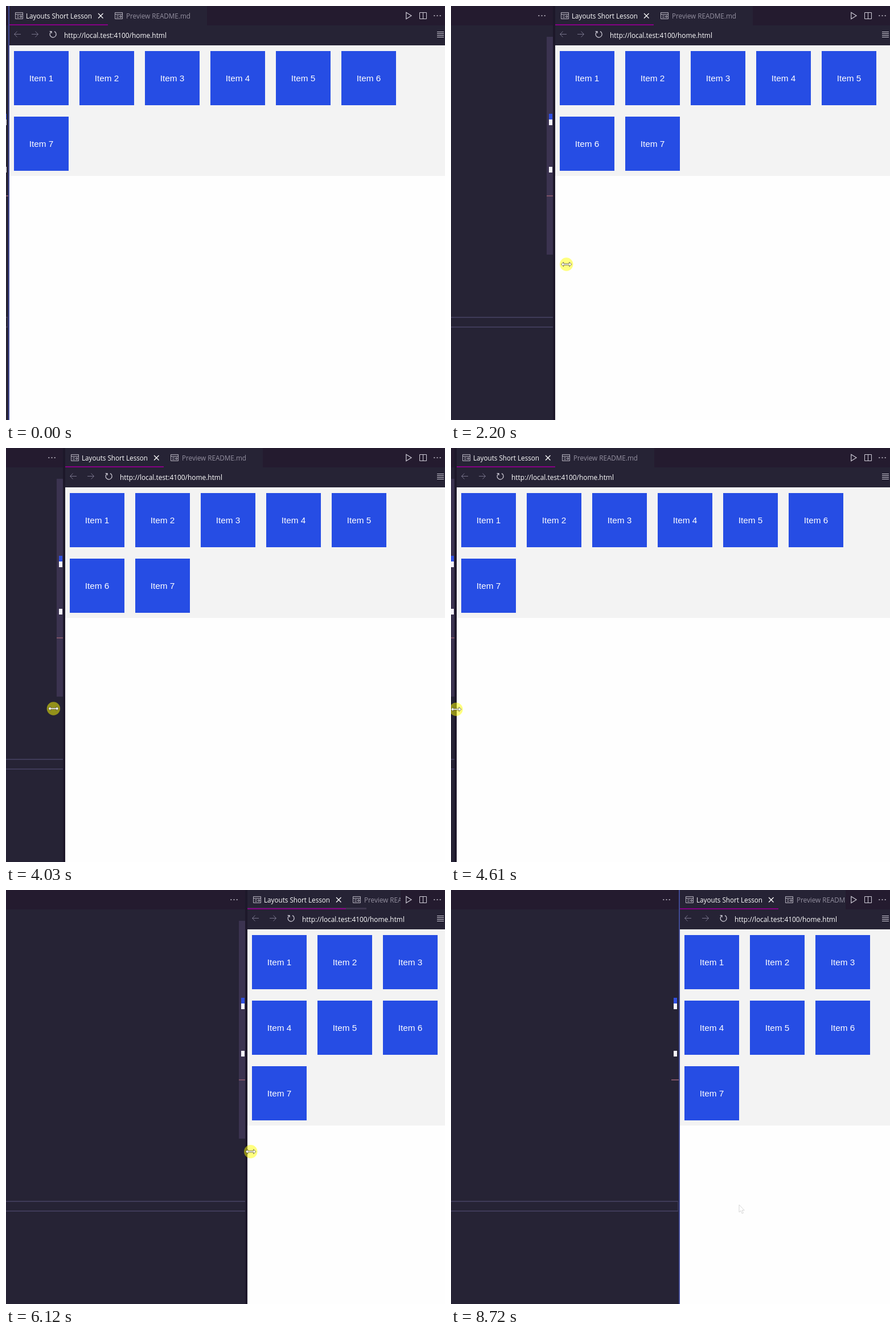
Animation of 771x726 px, one loop 8850 ms. Source, as an HTML page:

```html
<!DOCTYPE html>
<html lang="en">
<head>
<meta charset="utf-8">
<title>Resizable preview</title>
<style>
html, body { margin: 0; width: 100%; height: 100%; overflow: hidden; background: #262335; }
#stage { position: relative; width: 771px; height: 726px; overflow: hidden; background: #262335; font: 11.7px "Open Sans", "Noto Sans", sans-serif; }
#stage div, #stage svg, #stage span { position: absolute; }
svg { fill: none; stroke: #d0cdd8; overflow: visible; }

#editor { left: 0; top: 0; height: 726px; }
.head { left: 0; right: 0; top: 0; height: 34px; background: #241b2f; }
#slider { right: 2px; top: 54px; width: 11px; height: 382px; background: #3b3350; }
.mark { right: 3px; width: 6px; background: #f4f2fa; }
#rule { right: 0; top: 332px; width: 13px; height: 2px; background: #7d5366; }
#row { left: -2px; right: 1px; top: 545px; height: 15px; border: solid #3f3b59; border-width: 2px 0; }
#gap { left: -2px; top: 0; width: 4px; height: 726px; background: #1d182a; }
#focus { left: 0; top: 0; width: 2px; height: 726px; background: #414a96; }

#pane { right: 0; top: 0; height: 726px; }
#page { left: 2px; right: 0; top: 68px; bottom: 0; background: #fefefe; }
#items { left: 0; right: 0; top: 0; display: flex; flex-wrap: wrap; background: #f3f3f3; }
#items div { position: static; flex: none; width: 96px; height: 95px; margin: 11px 11px 9px 8px; background: #264de4; color: #fff; font: 15.33px/95px "Liberation Sans", Arial, sans-serif; text-align: center; }
#tabs { left: 2px; top: 0; width: 347px; height: 34px; background: #262335; }
#line { left: 2px; top: 32px; width: 173px; height: 2px; background: #850085; }
#thumb { left: 2px; top: 31px; height: 3px; background: #3e374f; }
#bar { left: 2px; right: 0; top: 34px; height: 35px; background: #262335; }
#tools { right: 0; top: 0; width: 78px; height: 34px; background: #241b2f; }
span { white-space: nowrap; color: #fff; line-height: 34px; top: 0; }
.dim { color: #9490a0; }
.faint { stroke: #77738a; }
#pointer { left: 0; top: 0; width: 1px; height: 1px; }
</style>
</head>
<body>
<div id="stage">
  <div id="editor">
    <div class="head"></div>
    <svg style="right:15px;top:16px" width="13" height="3"><path id="dots" d="M.3 1h2M5.500 1h2M10.700 1h2" stroke-width="1.600"/></svg>
    <div id="slider"></div>
    <div class="mark" style="top:189px;height:10px;background:#304fe0"></div>
    <div class="mark" style="top:199px;height:10px"></div>
    <div class="mark" style="top:282px;height:10px"></div>
    <div id="rule"></div>
    <div id="row"></div>
  </div>
  <div id="pane">
    <div id="page"><div id="items"></div></div>
    <div class="head"></div>
    <div id="tabs">
      <svg style="left:10px;top:11px" width="14" height="12"><path id="layout" d="M.5.5h13v11H.5zM.5 3.500h13M3 6h4M3 9h4M9 6h2.500v3H9z" stroke-opacity=".85"/></svg>
      <span style="left:29px">Layouts Short Lesson</span>
      <svg style="left:156px;top:13px" width="9" height="9"><path d="M0 0l8.500 8.500M8.500 0L0 8.500" stroke="#fff" stroke-width="1.300"/></svg>
      <svg style="left:185px;top:11px" width="14" height="12"><use href="#layout"/></svg>
      <span class="dim" style="left:205px">Preview README.md</span>
    </div>
    <div id="thumb"></div>
    <div id="line"></div>
    <div id="bar">
      <svg class="faint" style="left:8px;top:10px" width="12" height="11"><path d="M12 5.500H.5M5.500.5l-5 5 5 5"/></svg>
      <svg class="faint" style="left:39px;top:10px" width="12" height="11"><path d="M0 5.500h11.500M6.500.5l5 5-5 5"/></svg>
      <svg style="left:70px;top:9px" width="13" height="13"><path d="M3.500 2A5.500 5.500 0 1 0 9 1.600M.5 1.500h3.500V5" stroke-width="1.200"/></svg>
      <span style="left:96px;font-size:11.900px">http://local.test:4100/home.html</span>
      <svg style="right:2px;top:11px" width="12" height="10"><path d="M0 .5h12M0 3.500h12M0 6.500h12M0 9.500h12"/></svg>
    </div>
    <div id="tools">
      <svg style="left:9px;top:11px" width="11" height="12"><path d="M.8.3v11.400L10 6z" stroke-width="1.200"/></svg>
      <svg style="left:33px;top:11px" width="13" height="12"><path d="M.5.5h12v11H.5zM6.500.5v11"/></svg>
      <svg style="left:58px;top:16px" width="13" height="3"><use href="#dots"/></svg>
    </div>
    <div id="gap"></div>
    <div id="focus"></div>
  </div>
  <svg id="pointer">
    <g id="resize">
      <circle id="glow" r="11.700" fill="#ff0" fill-opacity=".5" stroke="none"/>
      <path d="M-9 0l4-4v2.800H5V-4L9 0 5 4V1.200H-5V4z" fill="#fff" stroke="#55502a" stroke-width=".8"/>
    </g>
    <path id="arrow" d="M0 0v13l3-2.600 2.200 5 2.200-1-2.200-4.800h4z" fill="#fff" stroke="#ccc" stroke-width=".8"/>
  </svg>
</div>
<script>
const LOOP = 8850, LAG = 80;
const $ = id => document.getElementById(id);

// [time, value] pairs; equal neighbours are pauses
const splitKeys = [[1300, 4], [2110, 157], [2200, 181], [3010, 358], [3240, 358],
  [4030, 102], [4060, 93], [4610, 8], [5000, 8], [5410, 221], [5800, 345],
  [5850, 352], [6120, 422], [6660, 450], [7030, 450], [7310, 400]];
const arriveKeys = [[130, 606], [970, 5]];
const leaveKeys = [[7690, 401], [8550, 506]];
const heightKeys = [[130, 700], [970, 450], [2200, 453], [3010, 451], [4030, 457],
  [5410, 459], [7690, 458], [8550, 552]];

// Monotone cubic through the keys, at rest at both ends
function track(keys, t) {
  const last = keys.length - 1;
  if (t <= keys[0][0]) return keys[0][1];
  if (t >= keys[last][0]) return keys[last][1];
  const i = keys.findIndex(k => k[0] > t) - 1;
  const secant = j => (keys[j + 1][1] - keys[j][1]) / (keys[j + 1][0] - keys[j][0]);
  const slope = j => {
    if (j === 0 || j === last) return 0;
    const a = secant(j - 1), b = secant(j);
    return a * b > 0 ? 2 * a * b / (a + b) : 0;
  };
  const [t0, v0] = keys[i], [t1, v1] = keys[i + 1];
  const h = t1 - t0, u = (t - t0) / h, w = 1 - u;
  return v0 * w * w * (1 + 2 * u) + v1 * u * u * (3 - 2 * u)
    + h * u * w * (slope(i) * w - slope(i + 1) * u);
}

const show = (id, on) => $(id).style.display = on ? "" : "none";

for (let i = 1; i <= 7; i++) {
  const item = document.createElement("div");
  item.textContent = "Item " + i;
  $("items").append(item);
}

function draw(t) {
  const split = Math.round(track(splitKeys, t));
  $("editor").style.width = $("pane").style.left = split + "px";

  const dragging = t >= 1250 && t < 7690;
  const fade = t < 1040 ? 0 : Math.max(0, Math.min(1, (8550 - t) / 800));
  $("slider").style.opacity = $("thumb").style.opacity = fade;
  show("gap", dragging);
  show("focus", !dragging);
  $("row").style.borderRightWidth = dragging ? 0 : "1px";

  const room = 691 - split;
  $("thumb").style.width = (room < 347 ? room * room / 347 : 0) + "px";

  const x = t < 1040 ? track(arriveKeys, t)
    : t < 7690 ? track(splitKeys, t + LAG) + 1
    : track(leaveKeys, t);
  const resizing = t >= 1040 && t < 7690;
  $("pointer").style.transform = `translate(${x}px, ${track(heightKeys, t)}px)`;
  show("pointer", t >= 130);
  show("resize", resizing);
  show("arrow", !resizing);
  show("glow", dragging);
}

function tick() {
  draw(performance.now() % LOOP);
  requestAnimationFrame(tick);
}
tick();
</script>
</body>
</html>
```
